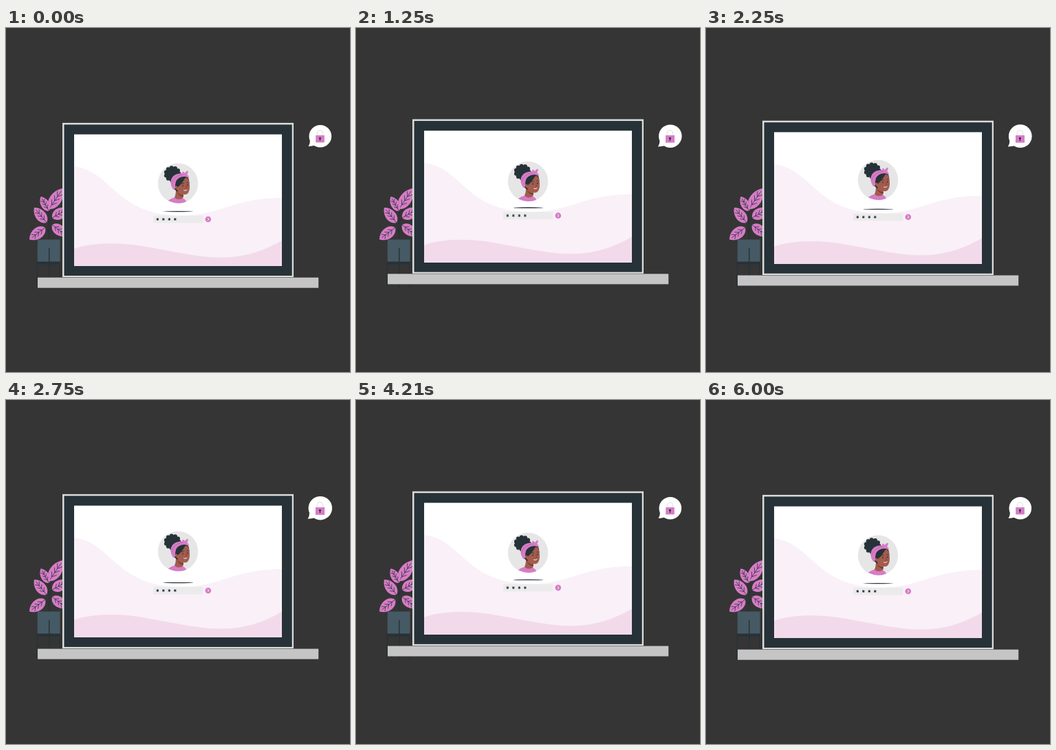
Animation, 500 px wide and 500 px high, one loop 6040 ms. Source, as an HTML page with a canvas:

```html
<!DOCTYPE html>
<html lang="en">
<head>
<meta charset="utf-8">
<title>Login</title>
<style>
html, body { margin: 0; width: 100%; height: 100%; overflow: hidden; background: #353535; }
canvas { display: block; width: 500px; height: 500px; }
</style>
</head>
<body>
<canvas id="stage" width="500" height="500"></canvas>
<script>
const ctx = document.getElementById('stage').getContext('2d');
const LOOP = 6040;
const DARK = '#263238', PINK = '#d67cc6', SKIN = '#a35c4e', GREY = '#e6e6e6';

function rect(color, x, y, w, h) {
  ctx.fillStyle = color;
  ctx.fillRect(x, y, w, h);
}

function circle(color, x, y, r) {
  ctx.fillStyle = color;
  ctx.beginPath();
  ctx.arc(x, y, r, 0, Math.PI * 2);
  ctx.fill();
}

function oval(color, x, y, rx, ry, turn = 0) {
  ctx.fillStyle = color;
  ctx.beginPath();
  ctx.ellipse(x, y, rx, ry, turn, 0, Math.PI * 2);
  ctx.fill();
}

function shape(color, d) {
  ctx.fillStyle = color;
  ctx.fill(new Path2D(d));
}

function line(color, width, d) {
  ctx.strokeStyle = color;
  ctx.lineWidth = width;
  ctx.stroke(new Path2D(d));
}

function shifted(dy, draw) {
  ctx.save();
  ctx.translate(0, dy);
  draw();
  ctx.restore();
}

// Linear rise and fall, 0 to 1 to 0.
function swing(t, period) {
  return 1 - Math.abs(1 - 2 * (t % period) / period);
}

// Two soft beats followed by a rest.
function beat(t) {
  const keys = [[0, 1], [760, 1.062], [1690, 1], [2640, 1.056], [3800, 1]];
  for (let i = 1; i < keys.length; i++) {
    const [t0, s0] = keys[i - 1], [t1, s1] = keys[i];
    if (t < t1) {
      const k = (1 - Math.cos(Math.PI * (t - t0) / (t1 - t0))) / 2;
      return s0 + (s1 - s0) * k;
    }
  }
  return 1;
}

function leaf(x, y, tipX, tipY, width) {
  const len = Math.hypot(tipX - x, tipY - y);
  ctx.save();
  ctx.translate(x, y);
  ctx.rotate(Math.atan2(tipY - y, tipX - x));
  ctx.fillStyle = PINK;
  ctx.beginPath();
  ctx.moveTo(0, 0);
  ctx.bezierCurveTo(len * 0.15, -width * 0.7, len * 0.7, -width * 0.75, len, 0);
  ctx.bezierCurveTo(len * 0.7, width * 0.75, len * 0.15, width * 0.7, 0, 0);
  ctx.fill();
  ctx.strokeStyle = DARK;
  ctx.lineWidth = 0.7;
  ctx.beginPath();
  ctx.moveTo(0, 0);
  ctx.lineTo(len * 0.86, 0);
  for (const k of [0.2, 0.4, 0.6]) {
    for (const side of [-1, 1]) {
      ctx.moveTo(len * k, 0);
      ctx.lineTo(len * (k + 0.17), side * width * 0.28);
    }
  }
  ctx.stroke();
  ctx.restore();
}

function plant() {
  line(DARK, 1.1, 'M62.5 308 C62 292 62.5 278 62.5 262 M62.5 284 L58 281 M62.5 300 C61 294 59 291 56 290 M62.5 284 C64 279 66 277 68 276 M62.5 300 C63 292 65 288 68 286');
  leaf(62.5, 263, 83, 233, 16);
  leaf(62.5, 266, 50.5, 245, 11.5);
  leaf(59, 283, 41, 261, 14);
  leaf(57, 290, 34, 307.5, 15);
  leaf(67, 276, 90, 263, 15);
  leaf(67, 286, 88, 302, 14);
  rect(DARK, 45, 340, 33.5, 3.5);
  for (const x of [44.7, 62, 77.5]) rect(DARK, x, 340, 1.5, 37.5);
  rect('#455a64', 45.8, 307.5, 32.7, 32);
  rect(DARK, 62, 320, 1.5, 24);
}

function star(x, y) {
  ctx.strokeStyle = DARK;
  ctx.lineWidth = 1;
  ctx.beginPath();
  for (let i = 0; i < 3; i++) {
    const a = Math.PI / 2 + i * Math.PI / 3;
    const dx = Math.cos(a) * 2, dy = Math.sin(a) * 2;
    ctx.moveTo(x - dx, y - dy);
    ctx.lineTo(x + dx, y + dy);
  }
  ctx.stroke();
}

function laptop() {
  rect('#c5c5c5', 46, 362.7, 408.2, 15);
  rect('#dcdcda', 82, 137.9, 336, 224.3);
  rect(DARK, 84.5, 140.4, 331.2, 219.6);
  rect('#ffffff', 99, 154.6, 302, 191.4);
  shape('#f9f0f8', 'M99 201.5 C151 206 158 268 245 272.3 C312 275 326 247 401 247 V346 H99 Z');
  shape('#f2daeb', 'M99 321 C125 311 168 311 207 318.5 C260 328 285 334 318 333.5 C350 332.5 376 323 401 309 V346 H99 Z');
  oval(DARK, 250.3, 266.6, 21.7, 0.65);
  rect('#ebebeb', 214, 272.8, 72.3, 10.6);
  for (const x of [220.3, 228.8, 237.3, 245.8]) star(x, 278);
  circle(PINK, 293.8, 278, 4.3);
  line('#ffffff', 0.9, 'M292.9 276 L295 278 L292.9 280');
}

function avatar() {
  circle(GREY, 250, 225.8, 29.2);
  // bun
  oval(DARK, 242, 212, 10.5, 10);
  for (let i = 0; i < 11; i++) {
    const a = i * Math.PI * 2 / 11;
    circle(DARK, 242 + Math.cos(a) * 9.5, 212 + Math.sin(a) * 8.8, 3);
  }
  // neck and top
  shape(SKIN, 'M247 234 L258 241 L257 249 Q251 254 243 248 Q247 246 247 234 Z');
  shape('#6f3a35', 'M248 238 Q252 243 258 243 L257.5 245.5 Q251 244 248 238 Z');
  shape(PINK, 'M235.8 251 Q240 247 245.5 246.5 Q249 251 257 247.5 Q261 249 262 252.5 Q250 257.5 235.8 251 Z');
  // head
  shape(DARK, 'M243 233 C240 221 249 212 259 213 C265 214 267 221 266 227 L249 238 Z');
  shape(SKIN, 'M247.5 231 C251 229 253 224 258 219 C261 216.5 264.5 217 266 222 C267.5 229 267.5 236 264.5 240 C261 244.5 252.5 241 249 236 Z');
  oval(SKIN, 248, 232, 2.2, 2.8, -0.3);
  shape(DARK, 'M247 229 C248 221 254 215 262 215 C259 221 255 227 250 231 Z');
  // headband with knot
  shape(PINK, 'M243.5 235 C236 226 239 213 252 211.5 Q260 210 265 214.5 L266 218 C258 213.5 250 217 247 223 Q245.5 228 246 233 Z');
  shape(PINK, 'M259 214 Q255 211 256.5 208.5 Q259 208.5 260 211 Q262 207.5 264.5 207.5 Q265.5 211 261.5 215 Z');
  line('#a9529a', 0.5, 'M241 226 C243 219 248 214 257 213');
  // face details
  oval(DARK, 257, 229.3, 0.8, 1.1);
  oval(DARK, 263.8, 228.3, 0.8, 1.1);
  line(DARK, 0.7, 'M255 226.5 Q257 225 259 226 M262.5 225 Q264 224 265.5 225');
  line('#6f3a35', 0.6, 'M261.5 229 L262.7 232.8 L260.8 233.2');
  line('#ffffff', 0.9, 'M258.3 235.8 Q261 237.3 263.3 235');
}

function bubble(scale) {
  ctx.save();
  ctx.translate(456.6, 157.2);
  ctx.scale(scale, scale);
  ctx.translate(-456.6, -157.2);
  circle('#ffffff', 456.8, 157.2, 16.3);
  shape('#ffffff', 'M442 163 Q442 168.5 439.5 172 Q445 171.5 449 170.5 Z');
  line('#e0e0e0', 1.1, 'M452.4 156.5 V153 A4 4 0 0 1 460.4 153 V156.5');
  rect(PINK, 450.2, 156, 12.6, 10.4);
  circle(DARK, 456.4, 160.2, 1.4);
  rect(DARK, 455.8, 160.5, 1.3, 3.4);
  ctx.restore();
}

function draw(t) {
  const time = Math.min(t, 6000);
  rect('#353535', 0, 0, 500, 500);
  plant();
  shifted(-6.4 * swing(time, 3000), laptop);
  shifted(-6.35 * swing(time, 6000), avatar);
  bubble(beat(time));
}

let start;
function tick(now) {
  if (start === undefined) start = now;
  draw((now - start) % LOOP);
  requestAnimationFrame(tick);
}
draw(0);
requestAnimationFrame(tick);
</script>
</body>
</html>
```
